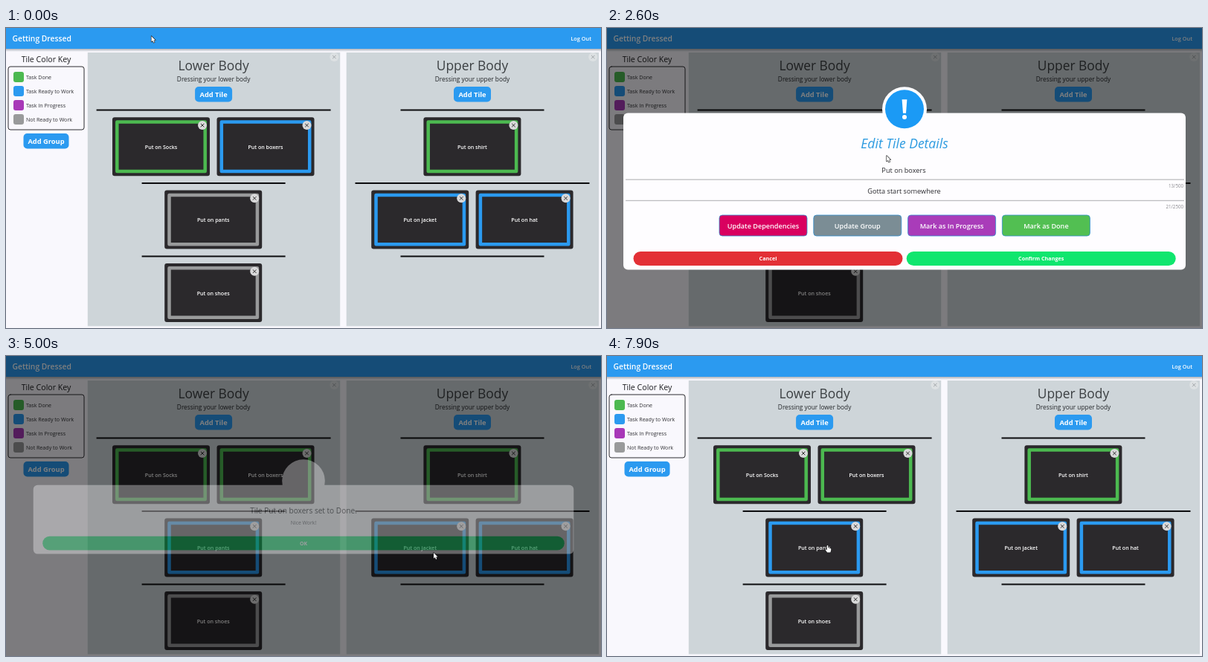
Recreate the animation shown at these times as an HTML page with a canvas. Size 800 by 404 pixels, loop 8000 ms.

```html
<!DOCTYPE html>
<html lang="en">
<head>
<meta charset="utf-8">
<title>Getting Dressed</title>
<style>
html, body { margin: 0; width: 100%; height: 100%; overflow: hidden; background: #f9f8fd; }
canvas { display: block; }
</style>
</head>
<body>
<canvas id="stage" width="800" height="404"></canvas>
<script>
const W = 800, H = 404, LOOP = 8000, STEP = 100;
const FONT = '"Open Sans", "Noto Sans", sans-serif';
const GREEN = '#4cb950', BLUE = '#2b9af0', PURPLE = '#a838b8', GRAY = '#999a9b';
const LIME = '#10e66e', PAPER = '#fefdff';
const DONE_AT = 4700;

const screen = document.getElementById('stage').getContext('2d');
const layer = Object.assign(document.createElement('canvas'), { width: W, height: H });
const layerCtx = layer.getContext('2d');
let c = screen;

// time, x, y, hand pointer
const pointerKeys = [
  [0, 195.5, 11], [99, 195.5, 11], [100, 341, 28], [299, 341, 28],
  [300, 403, 94], [599, 403, 94], [600, 405, 94], [700, 405, 94],
  [1000, 230, 150, 1], [1300, 290, 280, 1], [1550, 606, 268, 1],
  [1900, 343, 163, 1], [2200, 343, 163], [2600, 376, 172],
  [3200, 400, 186], [3800, 577, 264, 1], [4500, 577, 264],
  [5000, 575, 265], [5400, 575, 265], [6000, 402, 250, 1],
  [7000, 402, 250, 1], [7400, 288, 350, 1], [7900, 296.5, 255, 1], [8000, 296.5, 255, 1]
];

const ramp = (t, from, to) => Math.min(1, Math.max(0, (t - from) / (to - from)));
const smooth = p => p * p * (3 - 2 * p);

function box(x, y, w, h, r, fill, stroke, line = 1) {
  c.beginPath();
  c.roundRect(x, y, w, h, r);
  if (fill) { c.fillStyle = fill; c.fill(); }
  if (stroke) { c.strokeStyle = stroke; c.lineWidth = line; c.stroke(); }
}

function disc(x, y, r, fill) {
  c.beginPath();
  c.arc(x, y, r, 0, 7);
  c.fillStyle = fill;
  c.fill();
}

function text(str, x, y, size, color, weight = 400, align = 'center') {
  c.font = `${weight} ${size}px ${FONT}`;
  c.textAlign = align;
  c.fillStyle = color;
  c.fillText(str, x, y + size * 0.36);
}

function path(points, color, width) {
  c.beginPath();
  points.forEach(([x, y]) => c.lineTo(x, y));
  c.strokeStyle = color;
  c.lineWidth = width;
  c.lineCap = c.lineJoin = 'round';
  c.stroke();
}

function closeMark(x, y, fill, ink) {
  disc(x, y, 6, fill);
  path([[x - 2, y - 2], [x + 2, y + 2]], ink, 1);
  path([[x + 2, y - 2], [x - 2, y + 2]], ink, 1);
}

function button(label, x, y, w, h) {
  box(x, y, w, h, 5, BLUE);
  text(label, x + w / 2, y + h / 2, 9.3, '#fff', 700);
}

function tile(label, x, y, color) {
  box(x, y, 131, 79, 3, '#2b292c');
  c.strokeStyle = color;
  c.lineWidth = 4.5;
  c.strokeRect(x + 6.3, y + 6.3, 118.4, 66.4);
  text(label, x + 65.5, y + 40, 7.1, '#fff', 600);
  closeMark(x + 121, y + 10.7, '#d9d9da', '#333');
}

function rule(center, y, w) {
  c.fillStyle = '#0c0c0e';
  c.fillRect(center - w / 2, y - 1, w, 2);
}

function group(x, title, note) {
  const mid = x + 169.3;
  c.fillStyle = '#ced5d9';
  c.fillRect(x, 33, 339.4, 368.5);
  closeMark(x + 331.5, 39, '#dde1e3', '#a4a8ab');
  text(title, mid, 51, 17.4, '#3c4043');
  text(note, mid, 69, 8.3, '#222528');
  button('Add Tile', mid - 25, 79, 50, 20.5);
  return mid;
}

function board(t) {
  const done = t >= DONE_AT;
  c.fillStyle = '#f9f8fd';
  c.fillRect(0, 0, W, H);
  const shade = c.createLinearGradient(0, 28, 0, 32);
  shade.addColorStop(0, 'rgba(40,50,60,.35)');
  shade.addColorStop(1, 'rgba(40,50,60,0)');
  c.fillStyle = shade;
  c.fillRect(0, 28, W, 4);
  c.fillStyle = BLUE;
  c.fillRect(0, 0, W, 28);
  text('Getting Dressed', 8.5, 14, 10.3, '#fff', 600, 'left');
  text('Log Out', 787, 14, 7.3, '#fff', 600, 'right');

  text('Tile Color Key', 54, 42, 10.6, '#1c1c1f', 500);
  box(3, 52, 102, 85, 3, null, '#2c2c30');
  [['Task Done', GREEN], ['Task Ready to Work', BLUE], ['Task In Progress', PURPLE], ['Not Ready to Work', GRAY]]
    .forEach(([label, color], i) => {
      const y = 66 + i * 19;
      box(10, y - 7, 14, 14, 3, color);
      text(label, 27, y + 0.3, 7.1, '#303034', 400, 'left');
    });
  button('Add Group', 23.5, 142, 61, 20.5);

  const left = group(109.8, 'Lower Body', 'Dressing your lower body');
  rule(left, 110.5, 315);
  rule(left, 209, 193);
  rule(left, 307.5, 193);
  tile('Put on Socks', 143, 120.3, GREEN);
  tile('Put on boxers', 283.5, 120.3, done ? GREEN : BLUE);
  tile('Put on pants', 213.2, 218.6, done ? BLUE : GRAY);
  tile('Put on shoes', 213.2, 317, GRAY);

  const right = group(457.7, 'Upper Body', 'Dressing your upper body');
  rule(right, 110.5, 193);
  rule(right, 209, 315);
  rule(right, 307.5, 193);
  tile('Put on shirt', 561.4, 120.3, GREEN);
  tile('Put on jacket', 491.2, 218.6, BLUE);
  tile('Put on hat', 631.6, 218.6, BLUE);
}

function pill(label, x, y, w, h, fill) {
  box(x, y, w, h, h / 2, fill);
  text(label, x + w / 2, y + h / 2, 7.2, '#fff', 700);
}

function badge(y, color, grow, drawMark) {
  disc(400, y, 30, PAPER);
  if (grow <= 0) return;
  c.save();
  c.translate(400, y);
  c.scale(grow, grow);
  disc(0, 0, 26, color);
  drawMark();
  c.restore();
}

function exclamation() {
  c.fillStyle = '#fff';
  c.beginPath();
  c.moveTo(-3.4, -13);
  c.lineTo(3.4, -13);
  c.lineTo(2, 5.5);
  c.lineTo(-2, 5.5);
  c.fill();
  disc(0, 10.6, 3, '#fff');
}

function check() {
  path([[-14, 2.5], [-6, 10.5], [14, -10]], '#fff', 4.2);
}

function editDialog(grow) {
  box(22, 114.5, 756, 211, 6, PAPER);
  badge(109.3, '#1b9af5', grow, exclamation);
  text('Edit Tile Details', 400, 155.5, 17.6, '#2d9be0', 'italic 400');
  text('Put on boxers', 399, 191.5, 9.2, '#2b2b30');
  text('Gotta start somewhere', 399.5, 219.5, 9.2, '#2b2b30');
  c.fillStyle = '#bdbdc0';
  c.fillRect(25, 203.5, 751, 1.3);
  c.fillRect(25, 231.8, 751, 1.3);
  text('13/500', 775, 212.5, 6.2, '#8a8a8e', 400, 'right');
  text('21/2500', 775, 241, 6.2, '#8a8a8e', 400, 'right');
  [['Update Dependencies', '#d9005f'], ['Update Group', '#7b8d95'], ['Mark as In Progress', '#a93cb9'], ['Mark as Done', '#52bf52']]
    .forEach(([label, color], i) => {
      const x = 151 + i * 126.8;
      box(x, 252, 118, 28, 4, color, '#2f8fd0', 0.8);
      text(label, x + 59, 266.5, 9.1, '#fff', 600);
    });
  pill('Cancel', 35.5, 301, 362, 19, '#e33036');
  pill('Confirm Changes', 402.7, 301, 362, 19, LIME);
}

function doneDialog(grow, hover) {
  box(22, 172, 756, 96.5, 6, PAPER);
  badge(166, LIME, grow, check);
  text('Tile Put on boxers set to Done.', 400, 207.5, 10.5, '#1d1d20', 500);
  text('Nice Work!', 400, 225, 7.2, '#545458');
  c.save();
  c.translate(400, 253.5);
  c.scale(1 - 0.1 * hover, 1 - 0.1 * hover);
  pill('OK', -365, -9.7, 730, 19.4, LIME);
  c.restore();
}

// Draws a dialog on its own layer so it fades as one piece.
function popup(alpha, midY, draw) {
  if (alpha <= 0) return;
  const s = 0.94 + 0.06 * alpha;
  c = layerCtx;
  c.clearRect(0, 0, W, H);
  c.save();
  c.translate(400, midY);
  c.scale(s, s);
  c.translate(-400, -midY);
  draw();
  c.restore();
  c = screen;
  c.globalAlpha = alpha;
  c.drawImage(layer, 0, 0);
  c.globalAlpha = 1;
}

function arrow() {
  c.beginPath();
  [[0, 0], [0, 7.6], [1.8, 6], [3, 8.8], [4.3, 8.2], [3.1, 5.5], [5.4, 5.4]].forEach(([x, y]) => c.lineTo(x, y));
  c.closePath();
}

function hand() {
  c.beginPath();
  [[-0.8, 0.4], [0, -0.3], [0.8, 0.4], [0.9, 3.2], [4, 3.9], [4.8, 4.8], [4.6, 7.2], [3.8, 9.6],
   [-0.4, 9.6], [-2.8, 6.2], [-2.5, 5.2], [-0.8, 6.3]].forEach(([x, y]) => c.lineTo(x, y));
  c.closePath();
}

function pointer(t) {
  let i = pointerKeys.length - 2;
  while (i > 0 && pointerKeys[i][0] > t) i--;
  const [t0, x0, y0, isHand] = pointerKeys[i];
  const [t1, x1, y1] = pointerKeys[i + 1];
  const p = smooth(ramp(t, t0, t1));
  c.save();
  c.translate(x0 + (x1 - x0) * p, y0 + (y1 - y0) * p);
  (isHand ? hand : arrow)();
  c.lineJoin = 'round';
  c.lineWidth = 1.2;
  c.strokeStyle = '#18181a';
  c.stroke();
  c.fillStyle = '#fff';
  c.fill();
  c.restore();
}

function render(t) {
  board(t);
  const dim = ramp(t, 2150, 2350) - ramp(t, 4500, 4700) + ramp(t, 4750, 4950) - ramp(t, 6800, 7000);
  if (dim > 0) {
    c.fillStyle = `rgba(0,0,0,${0.5 * dim})`;
    c.fillRect(0, 0, W, H);
  }
  popup(ramp(t, 2200, 2500) - ramp(t, 4450, 4650), 220, () => editDialog(smooth(ramp(t, 2300, 2550))));
  popup(ramp(t, 4895, 5195) - ramp(t, 6800, 7000), 220,
    () => doneDialog(smooth(ramp(t, 5000, 5250)), smooth(ramp(t, 5500, 5800))));
  pointer(t);
}

function tick(now) {
  render(Math.floor(now % LOOP / STEP) * STEP);
  requestAnimationFrame(tick);
}
requestAnimationFrame(tick);
</script>
</body>
</html>
```
